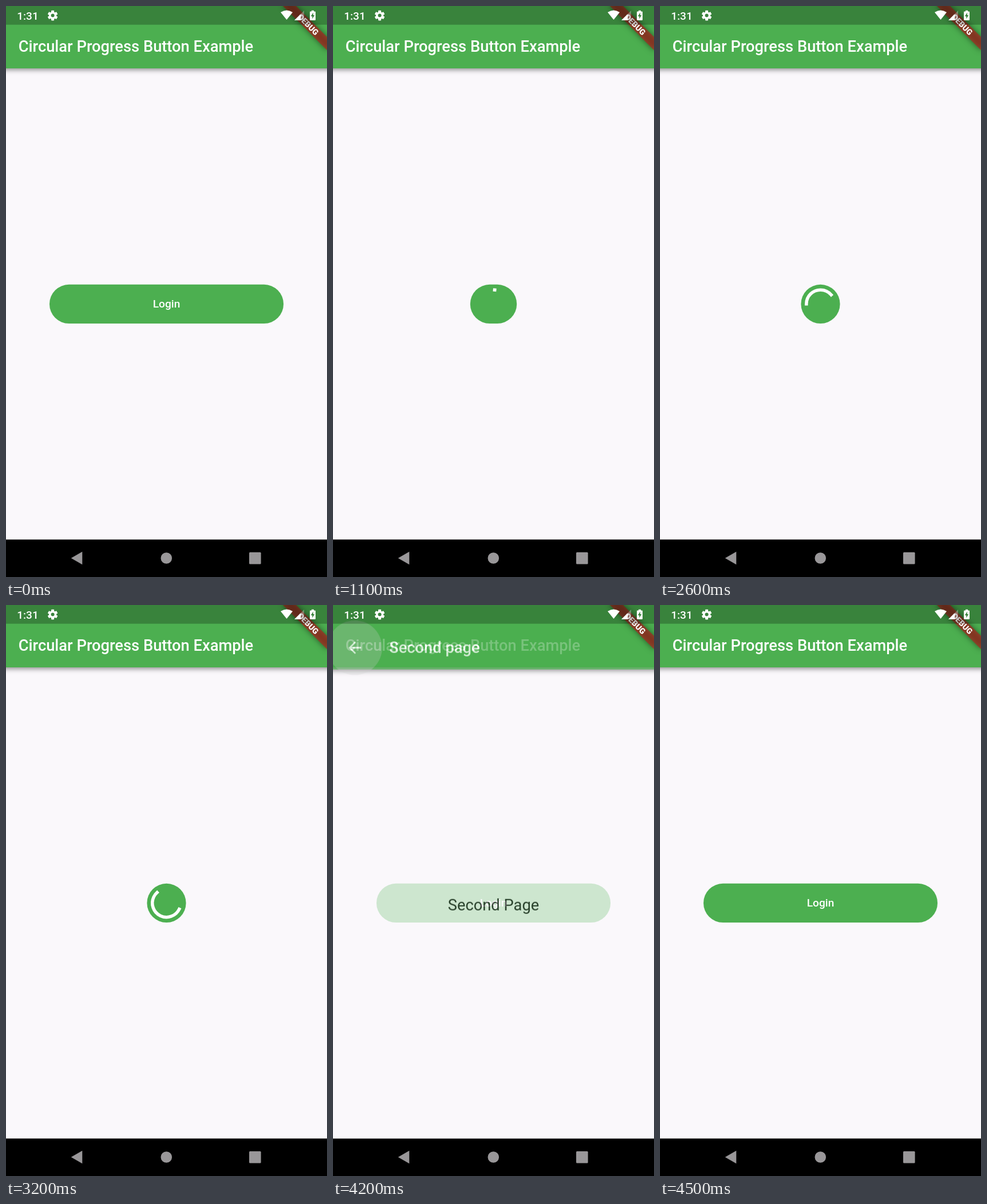
These frames come from a looping animation (561x998 px, 8 s). An HTML page with a canvas:

```html
<!DOCTYPE html>
<html lang="en">
<head>
<meta charset="utf-8">
<title>Circular Progress Button Example</title>
<style>
  html, body { margin: 0; width: 100%; height: 100%; overflow: hidden; background: #faf8fb; }
  canvas { display: block; }
</style>
</head>
<body>
<canvas id="stage" width="561" height="998"></canvas>
<script>
const W = 561, H = 998, LOOP = 8000, STEP = 100;
const DP = W / 411.43;
const BAR_BOTTOM = 109, NAV_TOP = 932.6, BAR_MID = 70.9;
const CX = W / 2, CY = 520.9;
const GREEN = '#4caf50', PAPER = '#faf8fb';
const TAU = Math.PI * 2;

const stage = document.getElementById('stage').getContext('2d');
const layer = document.createElement('canvas');
layer.width = W;
layer.height = H;
const layerCtx = layer.getContext('2d');

const clamp = v => Math.min(1, Math.max(0, v));

// Cubic Bezier easing, solved by bisection.
function bezier(x1, y1, x2, y2) {
  const at = (a, b, s) => 3 * a * s * (1 - s) ** 2 + 3 * b * s * s * (1 - s) + s ** 3;
  return x => {
    if (x <= 0) return 0;
    if (x >= 1) return 1;
    let lo = 0, hi = 1;
    for (let i = 0; i < 24; i++) {
      const mid = (lo + hi) / 2;
      if (at(x1, x2, mid) < x) lo = mid; else hi = mid;
    }
    return at(y1, y2, lo);
  };
}
const fastOutSlowIn = bezier(0.4, 0, 0.2, 1);
const easeIn = bezier(0.42, 0, 1, 1);

function text(c, str, x, midY, size, weight, color, align = 'left') {
  c.font = `${weight} ${size}px Roboto, sans-serif`;
  c.textAlign = align;
  c.fillStyle = color;
  c.fillText(str, x, midY + size * 0.3418);
}

function disc(c, x, y, r, color) {
  c.fillStyle = color;
  c.beginPath();
  c.arc(x, y, r, 0, TAU);
  c.fill();
}

function shape(c, points, color) {
  c.fillStyle = color;
  c.beginPath();
  points.forEach(([x, y]) => c.lineTo(x, y));
  c.fill();
}

function scaffold(c, title, titleX) {
  c.fillStyle = PAPER;
  c.fillRect(0, 0, W, NAV_TOP);
  c.save();
  c.shadowColor = 'rgba(0,0,0,0.42)';
  c.shadowBlur = 8;
  c.shadowOffsetY = 2.5;
  c.fillStyle = GREEN;
  c.fillRect(-20, -20, W + 40, BAR_BOTTOM + 20);
  c.restore();
  text(c, title, titleX, BAR_MID, 20 * DP, 500, '#fff');
}

function spinner(c, ms) {
  const cycle = ms / 1333 % 1;
  const head = fastOutSlowIn(cycle * 2);
  const tail = fastOutSlowIn(cycle * 2 - 1);
  const start = -TAU / 4 + tail * TAU * 0.75 + ms / 2222 * TAU + cycle * TAU / 4;
  const sweep = Math.max((head - tail) * TAU * 0.75, 0.001);
  c.strokeStyle = '#fff';
  c.lineWidth = 5.55;
  c.lineCap = 'square';
  c.beginPath();
  c.arc(CX, CY, 24.7, start, start + sweep);
  c.stroke();
}

function loginPage(c, t) {
  const size = 50 * DP, full = 300 * DP;
  const busy = t >= 500 && t < 4000;
  const width = busy ? full + (size - full) * clamp((t - 500) / 612) ** 2 : full;
  scaffold(c, 'Circular Progress Button Example', 16 * DP);
  c.fillStyle = GREEN;
  c.beginPath();
  c.roundRect(CX - width / 2, CY - size / 2, width, size, size / 2);
  c.fill();
  if (busy && t >= 1100) spinner(c, t - 1080 + 50 * clamp((t - 1100) / 400));
  else text(c, 'Login', CX, CY, 14 * DP, 500, '#fff', 'center');
}

function secondPage(c, t) {
  scaffold(c, 'Second page', 72 * DP);
  const x = 28 * DP;
  if (t >= 4200) disc(c, x, BAR_MID, 35 * DP, `rgba(200,200,200,${0.34 * clamp((4450 - t) / 250)})`);
  c.save();
  c.translate(x - 12 * DP, BAR_MID - 12 * DP);
  c.scale(DP, DP);
  c.fillStyle = '#fff';
  c.fill(new Path2D('M20 11H7.83l5.59-5.59L12 4l-8 8 8 8 1.41-1.41L7.83 13H20z'));
  c.restore();
  text(c, 'Second Page', CX, CY, 20 * DP, 400, '#1d1b1f', 'center');
}

function debugBanner(c) {
  const band = [-40 * DP, 28 * DP, 80 * DP, 12 * DP];
  c.save();
  c.translate(W, 0);
  c.rotate(TAU / 8);
  // The caster lies far off stage so that only its shadow lands here.
  c.save();
  const far = 2000;
  c.shadowColor = 'rgba(0,0,0,0.5)';
  c.shadowBlur = 10.8;
  c.shadowOffsetX = far;
  c.translate(-far * Math.SQRT1_2, far * Math.SQRT1_2);
  c.fillStyle = '#000';
  c.fillRect(...band);
  c.restore();
  c.fillStyle = 'rgba(183,28,28,0.627)';
  c.fillRect(...band);
  text(c, 'DEBUG', 0, 34 * DP, 10.2 * DP, 900, '#fff', 'center');
  c.restore();
}

function gear(c, x, y) {
  c.save();
  c.translate(x, y);
  c.fillStyle = '#fff';
  for (let i = 0; i < 3; i++) {
    c.beginPath();
    c.roundRect(-2.5, -8.8, 5, 17.6, 0.8);
    c.fill();
    c.rotate(TAU / 6);
  }
  disc(c, 0, 0, 6.5, '#fff');
  disc(c, 0, 0, 3, '#39833c');
  c.restore();
}

function statusBar(c) {
  c.fillStyle = 'rgba(0,0,0,0.25)';
  c.fillRect(0, 0, W, 24 * DP);
  text(c, '1:31', 19.2, 17, 14 * DP, 500, '#fff');
  gear(c, 81.6, 16.6);

  c.fillStyle = '#fff';
  c.beginPath();
  c.moveTo(490.5, 24);
  c.lineTo(480, 11);
  c.quadraticCurveTo(490.5, 4, 501, 11);
  c.fill();

  shape(c, [[504, 25], [521, 25], [521, 8]], 'rgba(255,255,255,0.3)');
  shape(c, [[504, 25], [515, 25], [515, 14]], '#fff');

  c.fillStyle = '#fff';
  c.beginPath();
  c.roundRect(531, 9.5, 10, 15.5, 1.2);
  c.rect(534, 7.8, 4, 2);
  c.fill();
  shape(c, [[536.8, 11.5], [532.8, 18], [535.3, 18], [535.3, 22.5], [539.2, 16], [536.8, 16]], '#39833c');
}

function navBar(c) {
  const gray = '#999799';
  c.fillStyle = '#000';
  c.fillRect(0, NAV_TOP, W, H - NAV_TOP);
  shape(c, [[113.8, 965], [133.3, 953.8], [133.3, 976.2]], gray);
  disc(c, 280.3, 965, 9.8, gray);
  c.fillStyle = gray;
  c.beginPath();
  c.roundRect(425, 954.8, 20.6, 20.6, 1.5);
  c.fill();
}

function routeProgress(t) {
  return t < 4100 ? clamp((t - 3231) / 300) : clamp(1 - (t - 4151) / 300);
}

function draw(t) {
  loginPage(stage, t);
  const route = routeProgress(t);
  if (route > 0) {
    layerCtx.clearRect(0, 0, W, H);
    secondPage(layerCtx, t);
    stage.globalAlpha = easeIn(route);
    stage.drawImage(layer, 0, (1 - fastOutSlowIn(route)) * NAV_TOP / 4);
    stage.globalAlpha = 1;
  }
  debugBanner(stage);
  statusBar(stage);
  navBar(stage);
}

const began = performance.now();
function tick() {
  const t = (performance.now() - began) % LOOP;
  draw(Math.floor(t / STEP) * STEP);
  requestAnimationFrame(tick);
}
tick();
</script>
</body>
</html>
```
